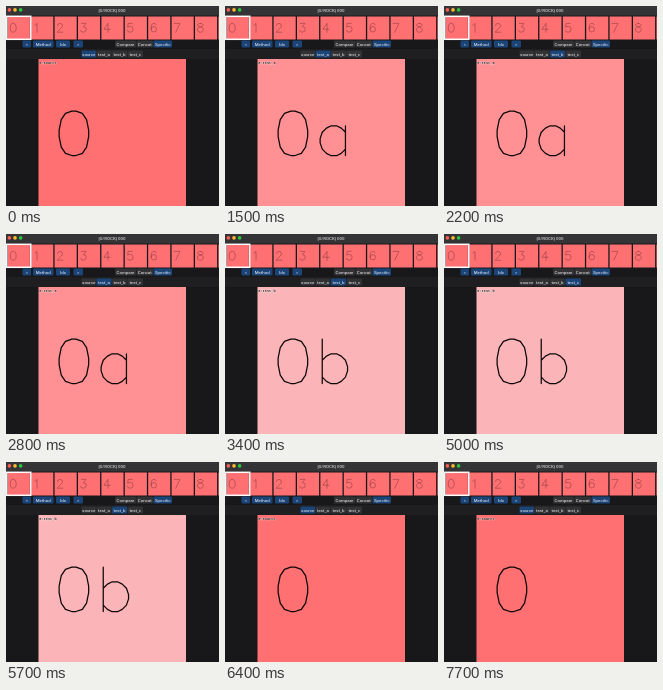
Recreate the animation shown at these times as an HTML page. Size 213x200 px, loop 7800 ms.

```html
<!DOCTYPE html>
<html lang="en">
<head>
<meta charset="utf-8">
<title>Glyph viewer</title>
<style>
  html, body { margin: 0; width: 100%; height: 100%; overflow: hidden; background: #18181b; }
  svg { display: block; width: 100vw; height: 100vh; }
  text { font-family: Roboto, "Liberation Sans", sans-serif; font-size: 4.4px; fill: #f0f0f2; text-anchor: middle; }
  .title { font-size: 4.4px; font-weight: 700; fill: #b4b4b6; }
  .label { font-family: "Liberation Mono", monospace; font-size: 3.6px; font-weight: 700; fill: #2a1a1a; text-anchor: start;
    paint-order: stroke; stroke: #fff; stroke-opacity: .6; stroke-width: .7px; }
  .pen { fill: none; stroke-linejoin: round; stroke-linecap: round; }
</style>
</head>
<body>
<svg id="stage" viewBox="0 0 213 200"></svg>
<script>
const stage = document.getElementById('stage');
const LOOP = 7800, LAG = 100;
const BLUE = '#1b4478', GREY = '#323235', CORAL = '#ff7072', INK = '#0c0606';
const THUMB_PITCH = 23.4;

// Pen strokes in font units, baseline at y = 0.
const DIGITS = [
  'M9-21L6-20 4-17 3-12V-9L4-4 6-1 9 0H11L14-1 16-4 17-9V-12L16-17 14-20 11-21Z',
  'M6-17L8-18 11-21V0',
  'M4-16Q4-21 10-21T16-15Q16-13 13-10L3 0H17',
  'M5-21H16L10-13Q17-13 17-7T10 0Q4 0 3-4',
  'M13 0V-21L3-7H18',
  'M15-21H5L4-12Q6-14 10-14 17-14 17-7T10 0Q4 0 3-4',
  'M16-18Q15-21 11-21 4-21 4-9V-7A6.5 6.5 0 1 0 17-7A6.5 6.5 0 0 0 4-7',
  'M3-21H17L7 0',
  'M10-21C2-21 2-14 8-13S17-10 17-6 14 0 10 0 3-2 3-6 6-12 12-13 18-21 10-21'
];
const BOWL = 'M15-11L13-13 11-14H8L6-13 4-11 3-8V-6L4-3 6-1 8 0H11L13-1 15-3';
const VIEWS = [
  { name: 'source', x: 75.5, w: 14.5, color: CORAL, glyph: '' },
  { name: 'test_a', x: 90.5, w: 15, color: '#ff9194', glyph: BOWL + 'M15-14V0' },
  { name: 'test_b', x: 106, w: 15, color: '#fbb5b8',
    glyph: 'M4-21V0M4-11L6-13 8-14H11L13-13 15-11 16-8V-6L15-3 13-1 11 0H8L6-1 4-3' },
  { name: 'test_c', x: 121.5, w: 15.5, color: '#fad7d7', glyph: BOWL }
];
// [time in ms, selected view]
const CLICKS = [[0, 0], [600, 1], [1000, 2], [1400, 1], [2200, 2], [2700, 1], [3200, 2],
  [3800, 3], [4600, 2], [5000, 3], [5500, 2], [6000, 1], [6300, 0]];

function add(tag, attrs, content = '') {
  const node = document.createElementNS('http://www.w3.org/2000/svg', tag);
  for (const key in attrs) node.setAttribute(key, attrs[key]);
  node.textContent = content;
  return stage.appendChild(node);
}
const rect = (x, y, width, height, fill, more) => add('rect', { x, y, width, height, fill, ...more });
const glyph = (d, x, y, scale, stroke, weight) => add('path', {
  d, class: 'pen', stroke, 'stroke-width': weight / scale, transform: `translate(${x} ${y}) scale(${scale})`
});
function button(name, x, y, w, h, fill) {
  const box = rect(x, y, w, h, fill, { rx: 1 });
  add('text', { x: x + w / 2, y: y + h / 2 + 1.6 }, name);
  return box;
}

rect(0, 0, 213, 200, '#18181b');
rect(0, 0, 213, 9.5, '#343436');
rect(0, 43, 213, 10, '#1f1f22');
['#fe5f57', '#febc2e', '#28c840'].forEach((fill, i) => add('circle', { cx: 3.4 + i * 5.6, cy: 3.9, r: 1.8, fill }));
add('text', { x: 106, y: 5.5, class: 'title' }, '[G/ROCK] 000');

for (let i = 0; i * THUMB_PITCH < 213; i++) {
  const x = 1.8 + i * THUMB_PITCH;
  rect(x, 10.5, THUMB_PITCH - 1.3, 23, CORAL);
  if (DIGITS[i]) glyph(DIGITS[i], x + 1.2, 26.2, .42, '#7c353a', .5);
}
rect(.8, 10.3, 24, 23, 'none', { stroke: '#fff', 'stroke-width': 1.5 });

[['<', 16.5, 8.5], ['Method', 27, 20.5], ['Idx', 50, 14], ['>', 67.5, 9.5]]
  .forEach(([name, x, w]) => button(name, x, 34.5, w, 7, BLUE));
[['Compare', 109, 21, GREY], ['Concat', 130.5, 16.5, GREY], ['Specific', 147.5, 18.5, BLUE]]
  .forEach(([name, x, w, fill]) => button(name, x, 34.5, w, 7, fill));

const tabs = VIEWS.map(v => button(v.name, v.x, 44.4, v.w, 7, GREY));
const canvas = rect(32.5, 53, 147.5, 147, CORAL);
const label = add('text', { x: 33.3, y: 58.2, class: 'label' });
glyph(DIGITS[0], 46.8, 149.5, 2.11, INK, 1.25);
const letter = glyph('', 88.8, 149.5, 2.11, INK, 1.25);

const selectedAt = t => CLICKS.filter(([start]) => start <= t).pop()[1];

function draw(t) {
  const active = selectedAt(t);
  // The canvas follows the tab one tick later.
  const view = VIEWS[selectedAt(Math.max(0, t - LAG))];
  tabs.forEach((tab, i) => tab.setAttribute('fill', i === active ? BLUE : GREY));
  canvas.setAttribute('fill', view.color);
  letter.setAttribute('d', view.glyph);
  label.textContent = '0:' + view.name;
}

const begin = performance.now();
function tick() {
  draw((performance.now() - begin) % LOOP);
  requestAnimationFrame(tick);
}
tick();
</script>
</body>
</html>
```
